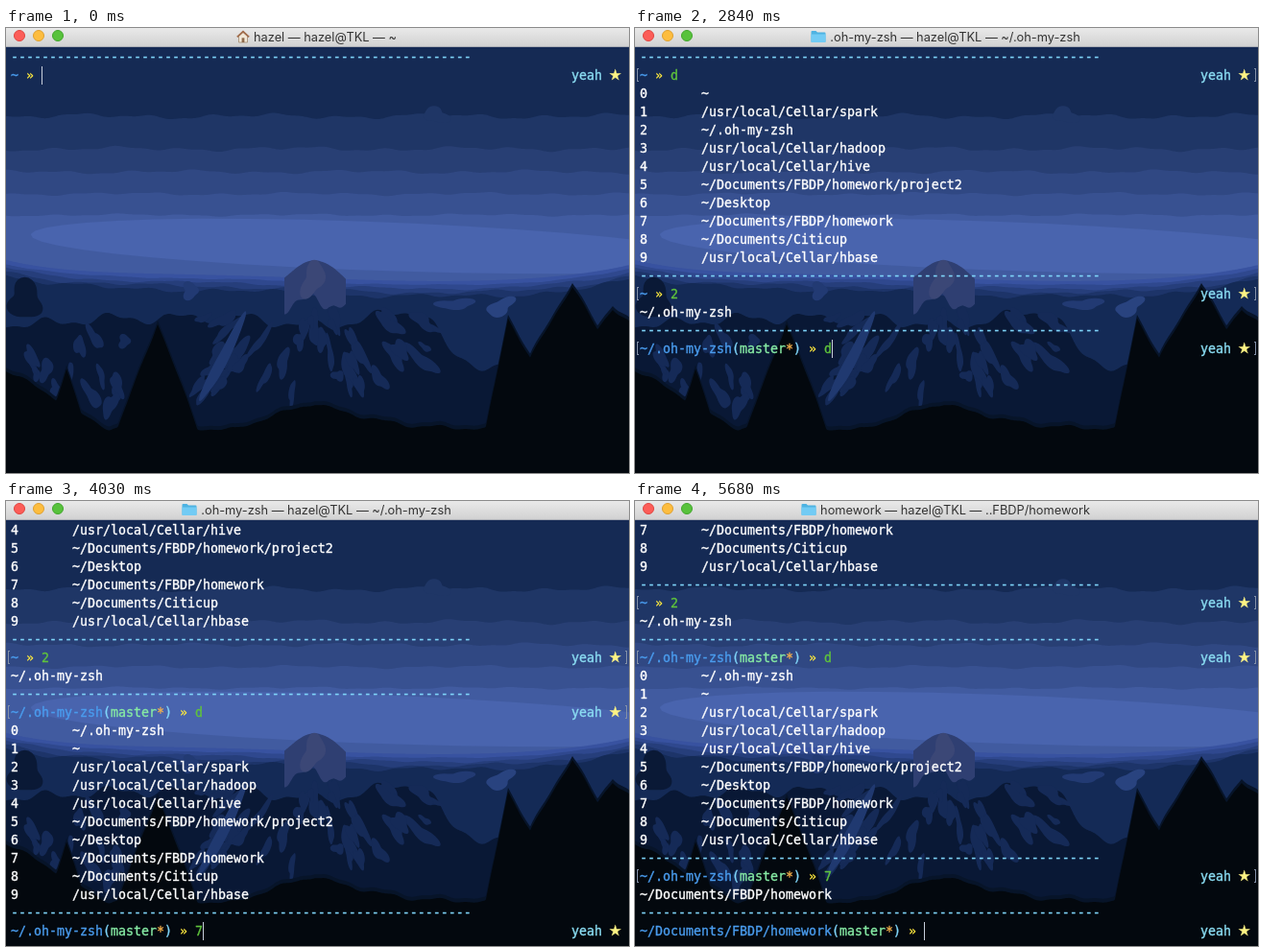
Write an HTML page with a canvas that moves like this. It is 649 px wide and 464 px high and loops after 5.98 s.

```html
<!DOCTYPE html>
<html lang="en">
<head>
<meta charset="utf-8">
<title>Terminal directory stack</title>
<style>
  html, body { margin: 0; width: 100%; height: 100%; overflow: hidden; background: #03080e; }
  #stage { position: relative; width: 649px; height: 464px; overflow: hidden; }
  canvas { position: absolute; left: 0; top: 0; }
  #bar {
    position: absolute; left: 0; top: 0; width: 647px; height: 18px; padding: 0 2px 1px 0;
    display: flex; align-items: center; justify-content: center;
    background: linear-gradient(#e9e9e9, #d2d2d2); border-bottom: 1px solid #a9adb5;
    font: 12.8px/17px Inter, "Open Sans", sans-serif; color: #333; white-space: pre;
  }
  #bar svg { margin-right: 4px; flex: none; }
  .light { position: absolute; top: 2px; width: 10px; height: 10px; border-radius: 50%; border: 1px solid; }
  #dot { position: absolute; left: 3px; top: 3px; width: 4px; height: 4px; border-radius: 50%; background: #6b0d0a; }
  #term {
    position: absolute; left: 0; top: 21px; width: 649px; height: 443px;
    font: 13.29px/19px "DejaVu Sans Mono", "Noto Sans Mono", monospace;
    -webkit-text-stroke: .35px; font-variant-ligatures: none; color: #fff; white-space: pre;
  }
  .row { position: absolute; left: 5px; height: 19px; }
  .right { position: absolute; left: 584px; top: 0; color: #8adcf2; }
  .star { position: absolute; left: 39px; top: 0; font: 15px/19px "DejaVu Sans", sans-serif; color: #fdf384; }
  .rule, .paren { color: #80d6fa; }
  .path { color: #4a9cee; }
  .arrow { color: #fce83e; font-weight: 700; -webkit-text-stroke: 0; }
  .cmd { color: #5fc33c; }
  .branch { color: #86eaa4; }
  .dirty { color: #f7b04a; }
  .mark { position: absolute; top: 2px; width: 1px; height: 12px; border: 1px solid #8390a8; }
  .mark.l { left: -3px; border-right: 0; }
  .mark.r { left: 640px; border-left: 0; }
  #cursor { position: absolute; width: 1px; height: 19px; background: #c6cedb; }
</style>
</head>
<body>
<div id="stage">
  <canvas id="scene" width="649" height="464"></canvas>
  <div id="bar">
    <i class="light" style="left:8px;background:#fc5d58;border-color:#e0443f"><b id="dot"></b></i>
    <i class="light" style="left:28px;background:#fdbd3f;border-color:#dfa02f"></i>
    <i class="light" style="left:48px;background:#58c23c;border-color:#41a62c"></i>
    <svg id="home" width="14" height="14" viewBox="0 0 14 14">
      <path d="M2.5 6.5V13h9V6.5L7 2.5z" fill="#f2e8d8" stroke="#a08a70" stroke-width=".8"/>
      <path d="M.8 7.3 7 1.6l6.2 5.7" fill="none" stroke="#a06a48" stroke-width="1.7"/>
      <path d="M5.6 8.3h2.8V13H5.6z" fill="#8d6a4c"/>
    </svg>
    <svg id="folder" width="16" height="14" viewBox="0 0 16 14">
      <path d="M.5 2Q.5 1 1.5 1h4L7 2.5h7.5q1 0 1 1V12q0 1-1 1h-13q-1 0-1-1z" fill="#4eb3e2"/>
      <path d="M.5 4.5h15V12q0 1-1 1h-13q-1 0-1-1z" fill="#72cbf4"/>
    </svg>
    <span id="title"></span>
  </div>
  <div id="term"></div>
</div>
<script>
const LOOP = 5980, ROWS = 23, CELL = 8, LINE = 19;
const $ = id => document.getElementById(id);

// ---------- night landscape ----------
const W = 649, H = 464;
const ctx = $('scene').getContext('2d');
let seed = 77;
const rand = (a = 0, b = 1) => a + (b - a) * (seed = seed * 16807 % 2147483647) / 2147483647;
const wave = (x, phase) => (Math.sin(x / 11 + phase) + Math.sin(x / 29 + phase * 2) + Math.sin(x / 5 + phase * 3) / 2) / 2;
const mix = (a, b, k) => `rgb(${a.map((v, i) => Math.round(v + (b[i] - v) * k))})`;

// Fill between two height functions
function fill(color, top, bottom = () => H, from = 0, to = W) {
  ctx.fillStyle = color;
  ctx.beginPath();
  for (let x = from; x <= to; x++) ctx.lineTo(x, top(x));
  for (let x = to; x >= from; x--) ctx.lineTo(x, bottom(x));
  ctx.fill();
}

// Wobbly ellipse
function blob(color, x, y, rx, ry, tilt = 0, rough = 0.2) {
  const phase = rand(0, 6);
  ctx.fillStyle = color;
  ctx.beginPath();
  for (let a = 0; a < Math.PI * 2; a += 0.15) {
    const k = 1 + rough * (Math.sin(a * 3 + phase) + Math.sin(a * 2 - phase));
    const u = Math.cos(a) * rx * k, v = Math.sin(a) * ry * k;
    ctx.lineTo(x + u * Math.cos(tilt) - v * Math.sin(tilt), y + u * Math.sin(tilt) + v * Math.cos(tilt));
  }
  ctx.fill();
}

const NIGHT = [21, 42, 84], GLOW = [73, 100, 174], HAZE = [56, 82, 160], HILL = [20, 42, 86];
const PEAK = { x: 322, y: 241 };

const horizon = x => 262 - 22 * Math.exp(-x / 80) - 14 * Math.exp((x - W) / 70) + 3 * Math.sin(x / 90 + 2.5);
const slope = x => 304 + 9 * wave(x, 1) + 6 * Math.sin(x / 37) + 42 / (1 + Math.exp((450 - x) / 6));
const peak = x => PEAK.y + ((x - PEAK.x) / 22) ** 2 * 20 / (1 + Math.abs(x - PEAK.x) / 30) + 1.5 * wave(x, 4);

// Tree tops: x, y, fall to the left, fall to the right
const trees = [
  [0, 358, 1, 0.55], [63, 355, 3, 3], [158, 309, 2.6, 2.6], [322, 392, 0.3, 0.24],
  [523, 301, 5, 1.9], [590, 270, 1.7, 1.7], [632, 291, 1.5, 0.8]
];
const treeLine = x => Math.min(417, ...trees.map(([cx, cy, l, r]) =>
  cy + (x < cx ? (cx - x) * l : (x - cx) * r))) + 3 * wave(x * 1.3, 2);

function paintScene() {
  fill(mix(NIGHT, GLOW, 0), () => 0);
  [92, 126, 150, 173, 195].forEach((y, i) => {
    const color = mix(NIGHT, GLOW, 0.2 + i * 0.16);
    fill(color, x => y + (3 - i * 0.4) * wave(x, y));
    if (!i) blob(color, 448, 91, 13, 8);
  });
  blob(mix(NIGHT, GLOW, 1), 390, 228, 375, 25, 0.035, 0.02);

  for (let i = 0; i <= 4; i++) {
    fill(mix(HAZE, HILL, i / 4), x => horizon(x) + i * (4 + 0.7 * wave(x, i)));
  }
  blob('#0a1936', 20, 284, 20, 17, 0.4);

  fill('#2f3f72', peak, x => 290 + 12 * wave(x * 1.6, 3), PEAK.x - 32, PEAK.x + 32);
  blob('#3b4776', PEAK.x - 2, 262, 12, 17, 0.3);
  fill('#091835', slope);

  // ridges fan out from the peak
  for (let i = 0; i < 42; i++) {
    const x = rand(195, 440), y = rand(302, 385);
    blob('#152a57', x, y, rand(6, 20), rand(3, 7), Math.atan2(y - PEAK.y, x - PEAK.x));
  }
  blob('#203970', 226, 344, 48, 6, 2.03, 0.1);
  for (let i = 0; i < 16; i++) {
    blob('#152a57', rand(20, 130), rand(295, 395), rand(3, 7), rand(6, 15), rand(-0.6, 0.4));
  }
  blob('#29437f', 515, 291, 15, 8, -0.3);
  blob('#223a73', 468, 288, 18, 6);
  blob('#223a73', 192, 274, 9, 8);

  fill('#071429', x => treeLine(x) - 4);
  fill('#03080e', treeLine);
}

// ---------- terminal session ----------
const CELLAR = '/usr/local/Cellar/', DOCS = '~/Documents/', ZSH = '~/.oh-my-zsh', WORK = DOCS + 'FBDP/homework';
const rest = [CELLAR + 'hadoop', CELLAR + 'hive', WORK + '/project2', '~/Desktop', WORK, DOCS + 'Citicup', CELLAR + 'hbase'];

const session = [];
const print = (at, ...texts) => texts.forEach(text => session.push({ at, text }));
const printStack = (at, dirs) => print(at, ...dirs.map((dir, i) => i + ' '.repeat(7) + dir));
function prompt(at, path, cmd = '', type = Infinity, enter = Infinity, mark = enter) {
  session.push({ at, rule: true }, { at, path, cmd, type, enter, mark });
}

prompt(0, '~', 'd', 450, 750);
printStack(750, ['~', CELLAR + 'spark', ZSH, ...rest]);
prompt(900, '~', '2', 1650, 1790);
print(1790, ZSH);
prompt(1940, ZSH, 'd', 2840, 2980, 2840);
printStack(2980, [ZSH, '~', CELLAR + 'spark', ...rest]);
prompt(3130, ZSH, '7', 4030, 4180);
print(4180, WORK);
prompt(4330, WORK);

const titles = [[4180, 'homework', '..FBDP/homework'], [1790, '.oh-my-zsh', ZSH], [0, 'hazel', '~']];
const within = (t, a, b) => t >= a && t < b;
const span = (cls, text) => `<span class="${cls}">${text}</span>`;

function lineHtml(line, t) {
  if (line.rule) return span('rule', '-'.repeat(60));
  if (line.text) return line.text;
  const git = line.path === '~' ? '' :
    span('paren', '(') + span('branch', 'master') + span('dirty', '*') + span('paren', ')');
  const marks = t >= line.mark ? span('mark l', '') + span('mark r', '') : '';
  return span('path', line.path) + git + ' ' + span('arrow', '»') + ' ' +
    span('cmd', t >= line.type ? line.cmd : '') + span('right', 'yeah ' + span('star', '★')) + marks;
}

function cursorCol(line, t) {
  return line.path.length + (line.path === '~' ? 0 : '(master*)'.length) + 3 + (t >= line.type ? line.cmd.length : 0);
}

let current = '';

function render(t) {
  const shown = session.filter(line => line.at <= t);
  const last = shown[shown.length - 1];
  const editing = last.path && t < last.enter;
  const row = editing ? shown.length - 1 : shown.length;
  const top = Math.max(0, row - ROWS + 1);
  let html = shown.slice(top).map((line, i) =>
    `<div class="row" style="top:${i * LINE}px">${lineHtml(line, t)}</div>`).join('');
  if (!within(t, 300, 450) && !within(t, 5230, 5680)) {
    const x = 5 + CELL * (editing ? cursorCol(last, t) : 0);
    html += `<div id="cursor" style="left:${x}px;top:${(row - top) * LINE}px"></div>`;
  }
  if (html === current) return;
  $('term').innerHTML = current = html;

  const [since, name, place] = titles.find(entry => t >= entry[0]);
  const busy = within(t, 2980, 3130);
  $('title').textContent = `${name} — hazel@TKL — ${place}`;
  $('home').style.display = since ? 'none' : '';
  $('folder').style.display = since ? '' : 'none';
  $('folder').style.opacity = busy ? 0.6 : 1;
  $('dot').style.display = busy ? '' : 'none';
}

const start = performance.now();

function tick() {
  render((performance.now() - start) % LOOP);
  requestAnimationFrame(tick);
}

paintScene();
tick();
</script>
</body>
</html>
```
